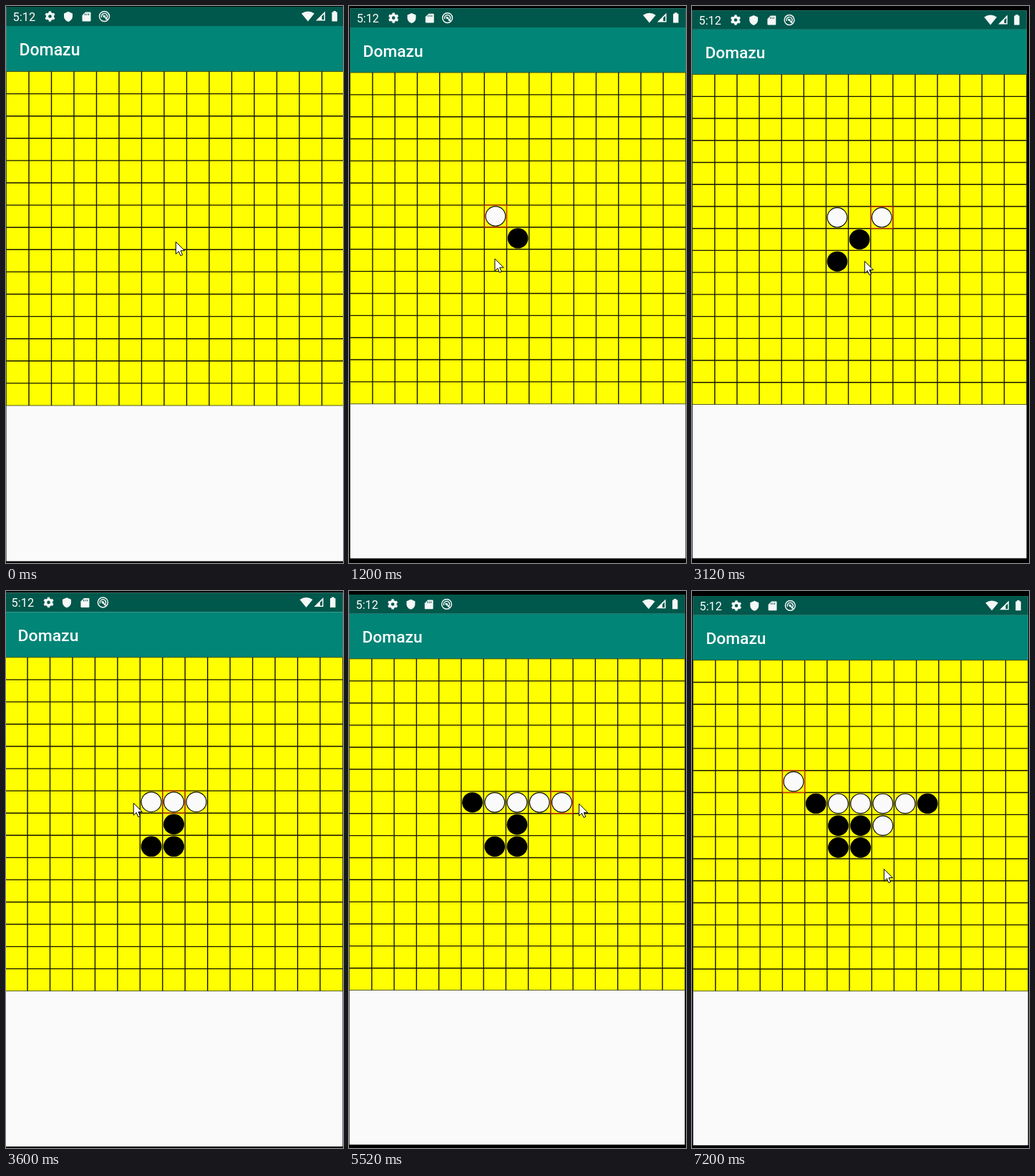
These frames come from a looping animation (471x778 px, 8 s). An HTML page:

```html
<!DOCTYPE html>
<html lang="en">
<head>
<meta charset="utf-8">
<title>Board game</title>
<style>
  html, body { margin: 0; width: 100%; height: 100%; overflow: hidden; background: #000; }
  svg { display: block; width: 471px; height: 778px; }
  text { font-family: Roboto, "Open Sans", sans-serif; fill: #fff; }
  .icons { fill: #f4f8f7; }
  .thin { fill: none; stroke: #f4f8f7; stroke-width: 1.5; }
  .grid { fill: none; stroke: #141400; stroke-width: 1.4; }
  .last { fill: none; stroke: #ff2a00; stroke-width: .9; }
  .white { fill: #fafafa; stroke: #111; stroke-width: 1.2; }
</style>
</head>
<body>
<svg viewBox="0 0 471 778">
  <!-- The origin is the top left corner of the board -->
  <g id="screen">
    <rect y="-90.5" width="472.5" height="774.5" fill="#fafafa"/>
    <rect y="-90.5" width="472.5" height="27" fill="#00574b"/>
    <rect y="-63.5" width="472.5" height="64" fill="#008577"/>
    <g transform="translate(-.5 -91.5)">
      <text x="9.5" y="20.7" font-size="16.4">5:12</text>
      <text x="18.5" y="69" font-size="23" font-weight="500">Domazu</text>
      <g class="icons">
        <g id="gear" transform="translate(61.5 14.5)">
          <circle r="4" fill="none" stroke="#f4f8f7" stroke-width="3.4"/>
        </g>
        <path d="M87 7.8l6 2.6v4.2c0 3.4-2.5 6.2-6 7.4-3.5-1.2-6-4-6-7.4v-4.2z"/>
        <path d="M111 8.5h6.500q1 0 1 1v11q0 1-1 1h-10q-1 0-1-1v-7.500z"/>
        <path d="M110.500 10.500v2.500m2.500-2.500v2.500m2.500-2.500v2.500" stroke="#00574b"/>
        <g class="thin" transform="translate(137.5 14.5)">
          <circle r="7"/>
          <path d="M-3.800 1.500A4 4 0 0 1 3.800-1.500 4 4 0 0 1 1.500 3.700M-2-1.500L5 5"/>
          <circle r="1"/>
        </g>
        <path d="M413 10.500Q422 4.500 431 10.500L422 21.500z"/>
        <path d="M433 20.500L446 7.500V20.500z"/>
        <path d="M441.500 14.500l3-3V19h-3z" fill="#00574b"/>
        <path d="M457.500 7h3.500v1.500h2v13h-7.500v-13h2z"/>
      </g>
    </g>
    <rect id="board" fill="#ff0" stroke="#3d4a10" stroke-width=".9"/>
    <path id="grid" class="grid"/>
    <g id="stones"></g>
    <rect id="last" class="last"/>
    <path id="pointer" d="M0 0V17L4 13.3 6.600 19.300 9.300 18.200 6.800 12.300H12.200Z"
          fill="#fff" stroke="#000" stroke-linejoin="round"/>
  </g>
</svg>
<script>
const CELLS = 15, W = 31.5, H = 31.1, STEP = 1200, LOOP = 8000;

// view: board left, top and zoom; click: pointer in cells; reply: white's square
const turns = [
  { view: [0.5, 91.5, 1],     click: [7.52, 7.65],  reply: "G7" },
  { view: [1.7, 93, 0.992],   click: [6.47, 8.43],  reply: "I7" },
  { view: [0.7, 95.6, 0.988], click: [7.73, 8.49],  reply: "H7" },
  { view: [-1.4, 92.8, 0.9987], click: [5.71, 6.55],  reply: "J7" },
  { view: [0.6, 94.8, 0.992], click: [10.27, 6.56], reply: "I8" },
  { view: [0.6, 93.4, 0.9946], click: [6.27, 7.57],  reply: "E6" },
  { view: [1.6, 96.7, 0.9905], click: [8.55, 9.47] }
];

const el = id => document.getElementById(id);
const set = (node, attrs) => {
  for (const k in attrs) node.setAttribute(k, attrs[k]);
  return node;
};
const add = (parent, tag, attrs = {}) =>
  parent.appendChild(set(document.createElementNS("http://www.w3.org/2000/svg", tag), attrs));
const show = (node, on) => set(node, { visibility: on ? "visible" : "hidden" });
const square = name => [name.charCodeAt(0) - 65, name.slice(1) - 1];

for (let a = 0; a < 360; a += 60)
  add(el("gear"), "rect", { x: -1.7, y: -7.2, width: 3.4, height: 3, transform: `rotate(${a})` });

let lines = "";
for (let i = 1; i < CELLS; i++)
  lines += `M${i * W} 0v${CELLS * H}M0 ${i * H}h${CELLS * W}`;
set(el("grid"), { d: lines });
set(el("board"), { width: CELLS * W, height: CELLS * H });
set(el("last"), { width: W, height: H });

const stone = (g, [col, row], r, name) => add(g, "ellipse", {
  cx: (col + 0.5) * W, cy: (row + 0.5) * H, rx: r, ry: r * H / W, class: name
});
const pairs = turns.filter(t => t.reply).map(({ click, reply }) => {
  const g = add(el("stones"), "g");
  stone(g, click.map(Math.floor), 14.5, "black");
  stone(g, square(reply), 14, "white");
  return g;
});

function pose(n) {
  const { view: [x, y, zoom], click: [col, row] } = turns[n];
  set(el("screen"), { transform: `translate(${x} ${y}) scale(${zoom})` });
  set(el("pointer"), { transform: `translate(${col * W} ${row * H})` });
  pairs.forEach((g, i) => show(g, i < n));
  show(el("last"), n > 0);
  if (n > 0) {
    const [c, r] = square(turns[n - 1].reply);
    set(el("last"), { x: c * W, y: r * H });
  }
}

let shown = -1;
function tick() {
  const n = Math.floor(performance.now() % LOOP / STEP);
  if (n !== shown) pose(shown = n);
  requestAnimationFrame(tick);
}
tick();
</script>
</body>
</html>
```
